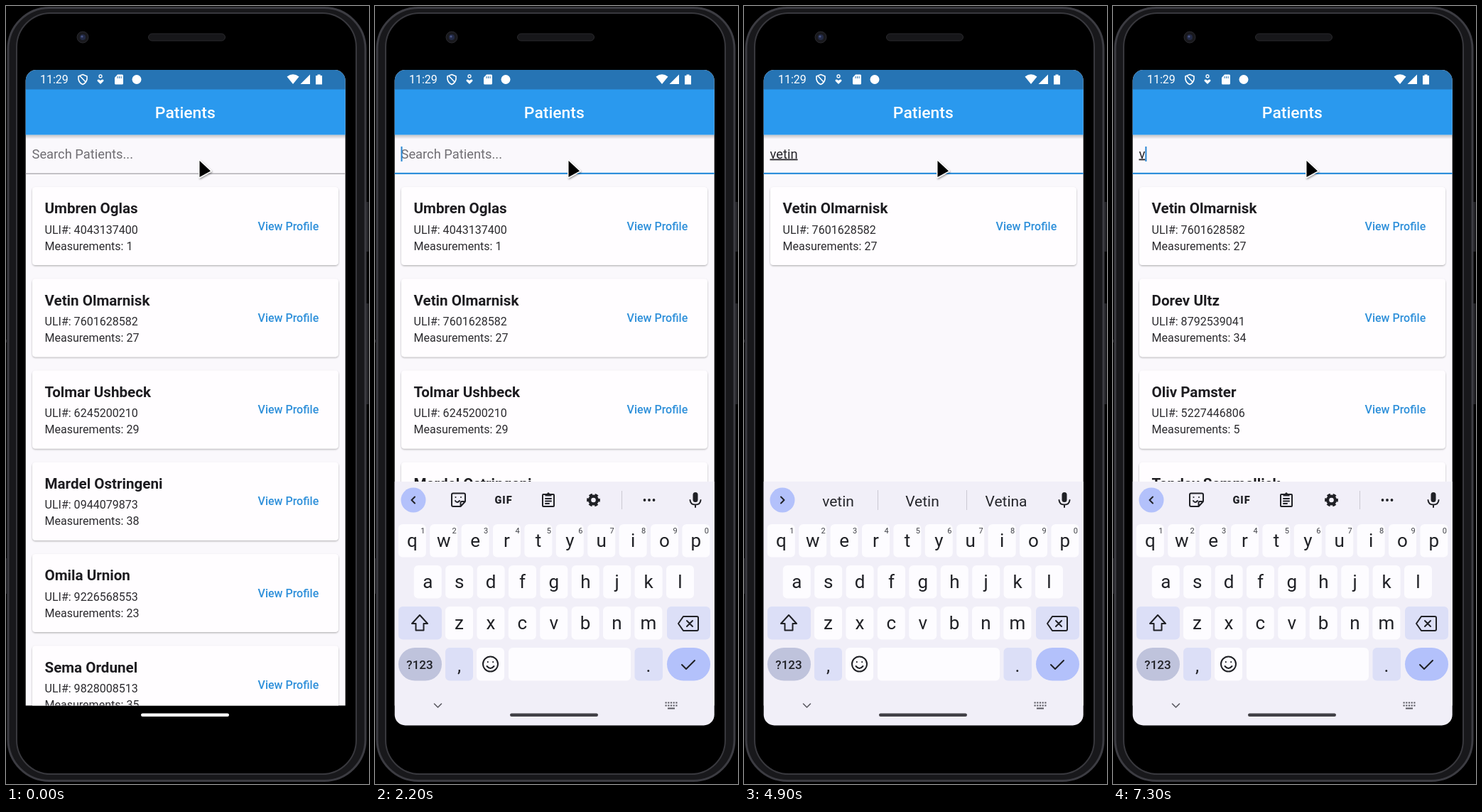
These frames come from a looping animation (511x1096 px, 7400 ms). An HTML page:

```html
<!DOCTYPE html>
<html lang="en">
<head>
<meta charset="utf-8">
<title>Patient search</title>
<style>
  html, body { margin: 0; width: 100%; height: 100%; overflow: hidden; background: #000; }
  svg { display: block; width: 100vw; height: 100vh; font-family: Roboto, sans-serif; }
  text { white-space: pre; }
  .title { font-size: 22.9px; font-weight: 500; fill: #fff; text-anchor: middle; }
  .name { font-size: 20.6px; font-weight: 600; fill: #1d1c20; }
  .detail { font-size: 16.04px; fill: #2b2a2e; }
  .link { font-size: 16.04px; font-weight: 500; fill: #2f90da; }
  .field { font-size: 18.33px; fill: #242328; }
  .hint { font-size: 18.33px; fill: #706e73; }
  .key { font-size: 26px; fill: #202126; text-anchor: middle; }
  .digit { font-size: 11px; fill: #3f4046; text-anchor: middle; }
  .word { font-size: 21px; fill: #25262b; text-anchor: middle; }
  .line { fill: none; stroke: #202126; stroke-width: 2; stroke-linecap: round; stroke-linejoin: round; }
  .ink { fill: #202126; }
</style>
</head>
<body>
<svg viewBox="0 0 511 1096">
  <defs>
    <clipPath id="screenClip"><rect x="27.700" y="90" width="450" height="923.500" rx="15"/></clipPath>
    <clipPath id="appClip"><rect x="27" y="90" width="452" height="895.500"/></clipPath>
    <linearGradient id="barShade" x2="0" y2="1">
      <stop offset="0" stop-color="#000" stop-opacity=".22"/><stop offset="1" stop-color="#000" stop-opacity="0"/>
    </linearGradient>
    <filter id="cardShade" x="-5%" y="-10%" width="110%" height="125%">
      <feDropShadow dx="0" dy="1.2" stdDeviation="1" flood-opacity=".3"/>
    </filter>
    <filter id="arrowShade" x="-50%" y="-50%" width="200%" height="200%">
      <feDropShadow dx="1" dy="1.5" stdDeviation="1.3" flood-opacity=".4"/>
    </filter>
  </defs>

  <!-- Phone body -->
  <rect width="511" height="1096"/>
  <path d="M508.500 276V346M508.500 419V561" stroke="#232327" stroke-width="4"/>
  <path d="M.5 470V474M.5 778V828" stroke="#27272b"/>
  <rect x="3" y="2.500" width="503" height="1089" rx="58" fill="#18181b" stroke="#3c3c42" stroke-width="3"/>
  <rect x="15" y="10" width="478" height="1072" rx="48" stroke="#38383d" stroke-width="2"/>
  <circle cx="108" cy="44" r="8" fill="#19191d" stroke="#29292e"/>
  <circle cx="108" cy="44" r="4" fill="#232a45"/>
  <circle cx="107" cy="43" r="1.600" fill="#4a5687"/>
  <rect x="200.500" y="39" width="108" height="10" rx="5" fill="#17171a" stroke="#29292d"/>

  <g clip-path="url(#screenClip)">
    <g clip-path="url(#appClip)">
      <rect x="27" y="90" width="452" height="896" fill="#faf8fc"/>
      <g id="cards"></g>
      <rect x="27" y="181.500" width="452" height="6" fill="url(#barShade)"/>
      <rect x="27" y="117" width="452" height="64.500" fill="#2a99ee"/>
      <rect x="27" y="90" width="452" height="27.500" fill="#2674b4"/>
      <text class="title" x="252.300" y="158">Patients</text>
      <text class="hint" id="hint" x="36.500" y="214.500">Search Patients...</text>
      <text class="field" id="field" x="36.500" y="214.500"></text>
      <rect id="caret" y="198" width="2" height="21" fill="#2785d2"/>
      <rect id="underline" x="27" width="452"/>
      <g fill="#fff">
        <text x="48" y="109" font-size="16">11:29</text>
        <path d="M108 96.500L114 99V103Q113 108.500 108 110.500Q103 108.500 102 103V99Z" fill="none" stroke="#fff" stroke-width="1.600"/>
        <path d="M104 98.500L112.500 107.500" stroke="#fff" stroke-width="1.600"/>
        <circle cx="133" cy="99" r="2" fill="none" stroke="#fff" stroke-width="1.300"/>
        <path d="M133 110L128.500 105.500Q128.500 102 133 105Q137.500 102 137.500 105.500Z"/>
        <path d="M157 96.500H163.500Q165 96.500 165 98V109Q165 110.500 163.500 110.500H154.500Q153 110.500 153 109V101Z"/>
        <path d="M157 99V102M159.500 99V102M162 99V102" stroke="#2674b4"/>
        <circle cx="184" cy="103.500" r="6.500"/>
        <path d="M395.500 99.500Q404 93 412.500 99.500L404 110Z"/>
        <path d="M428 96.500V110H414.500Z"/>
        <path d="M436 98H438.500V96.500H442.500V98H445V110.500H436Z"/>
      </g>
    </g>
    <rect x="190" y="996.500" width="124" height="4.500" rx="2.250" fill="#fff"/>
    <g id="keyboard">
      <rect x="27" y="670" width="452" height="344" fill="#f1eff8"/>
      <g id="keys"></g>
      <circle cx="54" cy="696" r="17.500" fill="#b3c1fb"/>
      <path class="line" id="chevron"/>
      <g id="tools">
        <path class="line" d="M110 686.500H125Q127 686.500 127 688.500V698L120.500 705H110Q108 705 108 703V688.500Q108 686.500 110 686.500ZM127 698H122Q120.500 698 120.500 700V705M113 697Q115.500 701 119 697"/>
        <path class="line" d="M113.500 692V692.100M121 692V692.100"/>
        <text class="ink" x="181" y="701" font-size="14.500" font-weight="900" letter-spacing="1" text-anchor="middle">GIF</text>
        <path class="line" d="M237 688H251Q252 688 252 689V704Q252 705 251 705H237Q236 705 236 704V689Q236 688 237 688ZM240 694H248M240 697.500H248M240 701H245"/>
        <path class="ink" d="M239.500 687H242Q244 683.500 246 687H248.500V690.500H239.500Z"/>
        <circle cx="307.500" cy="696" r="5.400" fill="none" stroke="#202126" stroke-width="4.200"/>
        <circle cx="307.500" cy="696" r="7.700" fill="none" stroke="#202126" stroke-width="3.400" stroke-dasharray="4.500 3.563" stroke-dashoffset="2.250"/>
        <path d="M347.500 683V709" stroke="#cbc9d3"/>
        <path d="M379.500 696H394" stroke="#202126" stroke-width="3.800" stroke-linecap="round" stroke-dasharray="0 6.500"/>
      </g>
      <g id="suggestions">
        <path d="M188.500 682V710M313.500 682V710" stroke="#cbc9d3"/>
        <text class="word" x="132.500" y="704.500"></text>
        <text class="word" x="251" y="704.500"></text>
        <text class="word" x="369" y="704.500"></text>
      </g>
      <rect class="ink" x="447.500" y="685" width="7" height="14" rx="3.500"/>
      <path class="line" d="M443.500 696Q444 702.500 451 702.500Q458 702.500 458.500 696M451 703V706"/>
      <path class="line" d="M63 858L74 870H68.500V879.500H57.500V870H52Z"/>
      <path class="line" d="M434 860H453Q455 860 455 862V878Q455 880 453 880H434L427 870ZM439 866L447 874M447 866L439 874"/>
      <circle class="line" cx="162.500" cy="927" r="10.500"/>
      <path class="line" d="M157.500 930Q162.500 936 167.500 930M158.800 924V924.200M166.200 924V924.200"/>
      <path class="line" d="M432 928L438 934L450 922"/>
      <path class="line" d="M83.500 983L88.500 988L93.500 983" style="stroke:#5b5a62;stroke-width:1.600"/>
      <path d="M408.500 981.500H426M408.500 985.500H426" stroke="#5b5a62" stroke-width="2.200" stroke-dasharray="2.200 1.500"/>
      <path d="M412 989.500H422" stroke="#5b5a62" stroke-width="2"/>
      <rect id="keyPill" x="190" y="996.500" width="124" height="4.500" rx="2.250"/>
    </g>
  </g>
  <path d="M272.500 218L288 232.500L272.500 241Z" stroke="#fff" stroke-width="3" stroke-linejoin="round" paint-order="stroke" filter="url(#arrowShade)"/>
</svg>
<script>
const LOOP = 7400, FOCUS = 450, SLIDE = [500, 800], PILL_DARK = 1200;
const UNDERLINE_FROM = 3420, SUGGEST_LAG = 120;
const $ = id => document.getElementById(id);

const patients = [
  ['Umbren Oglas', '4043137400', 1],
  ['Vetin Olmarnisk', '7601628582', 27],
  ['Tolmar Ushbeck', '6245200210', 29],
  ['Mardel Ostringeni', '0944079873', 38],
  ['Omila Urnion', '9226568553', 23],
  ['Sema Ordunel', '9828008513', 35],
  ['Dorev Ultz', '8792539041', 34],
  ['Oliv Pamster', '5227446806', 5],
  ['Tandov Semmellick', '3160482975', 12],
  ['Vetlen Dorsch', '8608464470', 14],
  ['Vesumba Torlimend', '5684739113', 35]
];

// When each state of the search field begins
const edits = [
  [0, ''], [2580, 'v'], [2760, 've'], [2930, 'vet'], [3100, 'veti'], [3270, 'vetin'],
  [5230, 'veti'], [5440, 'vet'], [5660, 've'], [5950, 'v']
];
const thirdWord = { ve: 'Vela', vet: 'Veten', veti: 'Vetina', vetin: 'Vetina' };

const lastEdit = t => edits.filter(([start]) => start <= t).pop() || edits[0];

function cardMarkup([name, uli, count], i) {
  return `<g transform="translate(0 ${i * 129.25})">
    <rect x="37" y="255" width="431" height="110" rx="4.6" fill="#fffdff" filter="url(#cardShade)"/>
    <text class="name" x="54.5" y="292.300">${name}</text>
    <text class="detail" x="54.5" y="320.700">ULI#: ${uli}</text>
    <text class="detail" x="54.5" y="343.700">Measurements: ${count}</text>
    <text class="link" x="354.5" y="315.500">View Profile</text></g>`;
}

function buildKeys() {
  const key = (x, y, w = 39, fill = '#fdfcff', r = 6) =>
    `<rect x="${x}" y="${y}" width="${w}" height="46.5" rx="${r}" fill="${fill}"/>`;
  const label = (cls, x, y, s) => `<text class="${cls}" x="${x}" y="${y}">${s}</text>`;
  const soft = '#dcdff7';
  let out = '';
  [['qwertyuiop', 52.3, 730], ['asdfghjkl', 74.3, 788], ['zxcvbnm', 118.5, 846]].forEach(([row, x0, y], r) => {
    [...row].forEach((ch, i) => {
      const x = x0 + i * 44.4;
      out += key(x - 19.5, y) + label('key', x, y + 32, ch);
      if (r === 0) out += label('digit', x + 15, y + 13, (i + 1) % 10);
    });
  });
  out += key(33, 846, 61, soft) + key(411, 846, 61, soft);
  out += key(33, 904, 61, '#bfc3dc', 23.2) + key(99, 904, 39, soft) + key(143, 904);
  out += key(188, 904, 172) + key(365.5, 904, 39.5, soft) + key(411, 904, 61, '#b3c1fb', 23.2);
  out += label('key', 118.5, 938, ',') + label('key', 385, 938, '.');
  out += '<text class="ink" x="63" y="934" font-size="17" font-weight="500" text-anchor="middle">?123</text>';
  $('keys').innerHTML = out;
}

const show = (id, on) => $(id).setAttribute('visibility', on ? 'visible' : 'hidden');

let shownQuery = null;
function showQuery(query) {
  if (query === shownQuery) return;
  shownQuery = query;
  $('cards').innerHTML = patients
    .filter(([name]) => name.toLowerCase().includes(query))
    .slice(0, 6).map(cardMarkup).join('');
  $('field').textContent = query;
  show('hint', !query);
  $('caret').setAttribute('x', 36.5 + (query ? $('field').getComputedTextLength() : 0));
}

function showSuggestions(query) {
  const on = query.length > 1;
  show('tools', !on);
  show('suggestions', on);
  $('chevron').setAttribute('d', on ? 'M52 691.5L56.500 696L52 700.500' : 'M56 691.5L51.500 696L56 700.500');
  if (!on) return;
  const words = [query, query[0].toUpperCase() + query.slice(1), thirdWord[query]];
  document.querySelectorAll('.word').forEach((el, i) => { el.textContent = words[i]; });
}

function render(t) {
  const [editTime, query] = lastEdit(t);
  showQuery(query);
  showSuggestions(lastEdit(t - SUGGEST_LAG)[1]);
  $('field').setAttribute('text-decoration', t >= UNDERLINE_FROM ? 'underline' : 'none');

  const focused = t >= FOCUS;
  const line = $('underline');
  line.setAttribute('y', focused ? 234.8 : 235.6);
  line.setAttribute('height', focused ? 2.2 : 1.2);
  line.setAttribute('fill', focused ? '#2e8fdb' : '#a09ea3');

  // The caret restarts its blink on each edit and once the keyboard has settled
  const blinkStart = editTime || (t >= SLIDE[1] ? SLIDE[1] : FOCUS);
  show('caret', focused && (t - blinkStart) % 1000 < 500);

  const p = Math.min(1, Math.max(0, (t - SLIDE[0]) / (SLIDE[1] - SLIDE[0])));
  $('keyboard').setAttribute('transform', `translate(0 ${343 * (1 - p) ** 3})`);
  show('keyboard', p > 0);
  $('keyPill').setAttribute('fill', t < PILL_DARK ? '#b9b7bf' : '#414046');
}

buildKeys();
const start = performance.now();
function tick() {
  render((performance.now() - start) % LOOP);
  requestAnimationFrame(tick);
}
tick();
</script>
</body>
</html>
```
